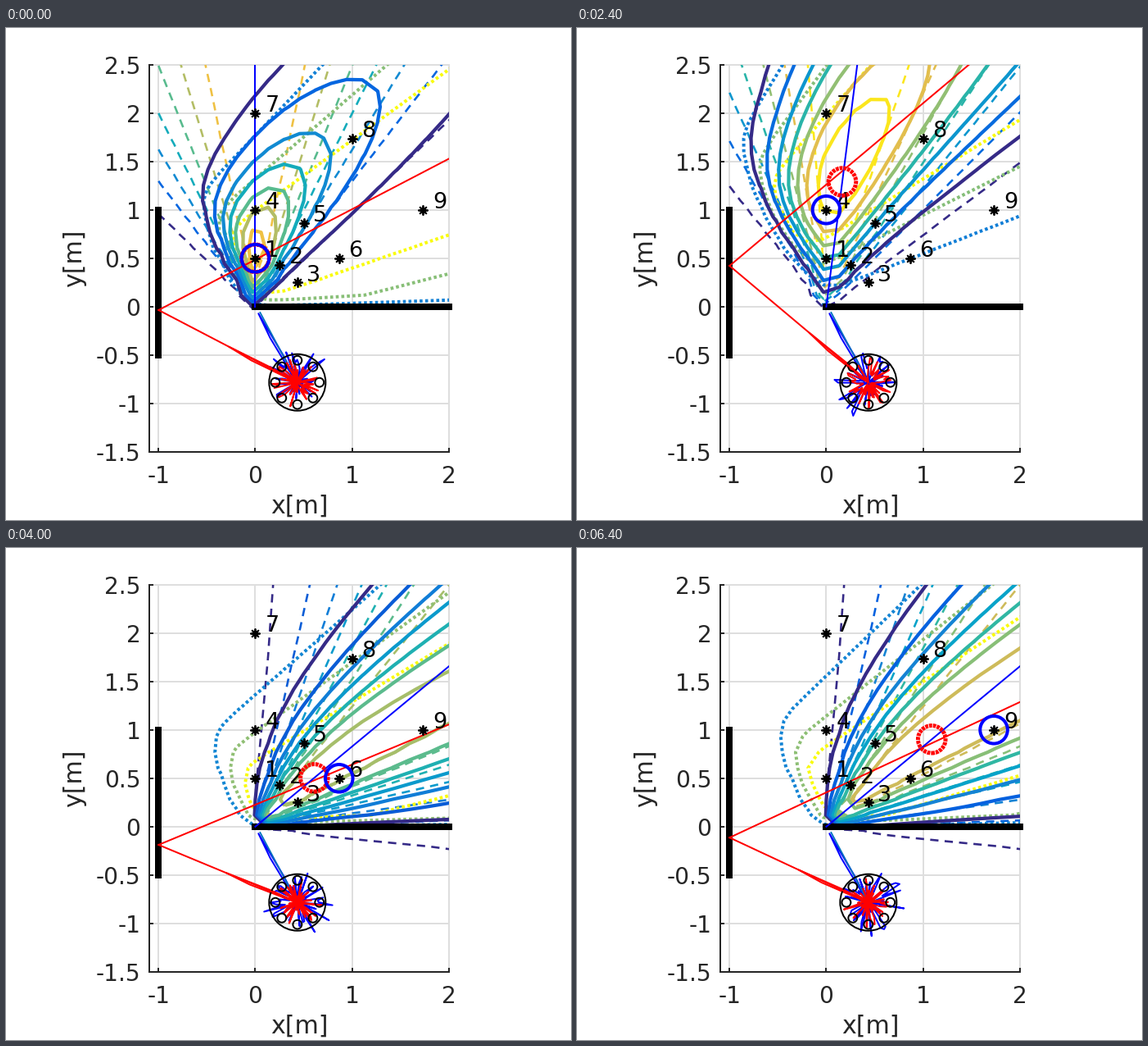
A matplotlib script for the animation above (7200 ms loop, 690 by 600 pixels).

```python
import numpy as np
import matplotlib.pyplot as plt
from matplotlib.animation import FuncAnimation
from matplotlib.colors import LinearSegmentedColormap
from matplotlib.patches import Circle

W, H, DPI = 690, 600, 100
STEP = 800
DARK = "#262626"

plt.rcParams["font.family"] = "DejaVu Sans"
plt.rcParams["axes.unicode_minus"] = False

PARULA = LinearSegmentedColormap.from_list("parula", [
    "#352a87", "#0363e1", "#1484d4", "#06a5c8", "#32b8a1",
    "#8cbf75", "#d3bb58", "#fec437", "#f9fb0e"])

# Three rings of three targets, 30 degrees apart
TARGETS = [(r * np.sin(a), r * np.cos(a))
           for r in (0.5, 1, 2) for a in np.radians((0, 30, 60))]

# Per ring: first and last reading; the middle target lies halfway
BLUE = ((90, 46.8), (82.7, 39.6), (78, 39.6))
RED = ((27.5, 22.5), (40, 22.5), (45, 25))
REACH = ((0.5, 0.43), (1.3, 0.79), (2.11, 1.415))

ARRAY = (0.435, -0.782)
WALL_X = -1
MIRROR = (2 * WALL_X - ARRAY[0], ARRAY[1])
EDGE = 120                        # line of sight past the corner, degrees
SIG_DIFF, SIG_REFL = 22.6, 11.3   # angular spread, degrees

CELL = 0.162
X, Y = np.meshgrid(-1 + CELL * np.arange(20), -1.5 + CELL * np.arange(26))
CORNER_ANG = np.degrees(np.arctan2(Y, X))
MIRROR_ANG = np.degrees(np.arctan2(Y - MIRROR[1], X - MIRROR[0]))


def pt(px):
    return px * 72 / DPI


def polar(r, deg, center=(0, 0)):
    t = np.radians(deg)
    return center[0] + r * np.cos(t), center[1] + r * np.sin(t)


def reading(pairs, i):
    return np.linspace(*pairs[i // 3], 3)[i % 3]


def bell(angle, mean, sigma):
    d = (angle - mean + 180) % 360 - 180
    return np.exp(-0.5 * (d / sigma) ** 2)


def fields(blue, red):
    ux, uy = polar(1, EDGE)
    shade = 1 / (1 + np.exp((Y * ux - X * uy) / 0.065))
    diff = bell(CORNER_ANG, blue, SIG_DIFF)
    refl = bell(MIRROR_ANG, red, SIG_REFL) * shade * (Y > 0)
    return diff, refl


def contours(z, levels, shades, width, dash, z_order):
    ax.contour(X, Y, z, levels=levels, colors=[PARULA(s) for s in shades],
               linewidths=pt(width), linestyles=[dash], zorder=z_order)


def segment(p, q, color, width=2, z_order=6, **style):
    ax.plot((p[0], q[0]), (p[1], q[1]), color=color, lw=pt(width),
            zorder=z_order, **style)


def ring(center, radius, color, width, z_order, dash="solid"):
    ax.add_patch(Circle(center, radius, fill=False, ec=color, lw=pt(width),
                        ls=dash, zorder=z_order))


def beam(rng, angle, length, spread, color, z_order):
    """Spiky polar response with one long main lobe."""
    noise = angle + np.arange(6, 355, 5)
    main = angle + np.arange(-4, 5, 2)
    r_noise = spread * rng.random(noise.size) ** 1.7
    r_main = length * bell(main, angle + 0.4, 1.7)
    a, r = np.append(main, noise), np.append(r_main, r_noise)
    ax.plot(*polar(np.append(r, r[0]), np.append(a, a[0]), ARRAY), color=color,
            lw=pt(2), solid_joinstyle="round", zorder=z_order)


def setup():
    ax.clear()
    ax.set(xlim=(-1.1, 2), ylim=(-1.5, 2.5))
    x_ticks, y_ticks = np.arange(-1, 3), np.arange(-1.5, 2.6, 0.5)
    ax.set_xticks(x_ticks, [f"{v:g}" for v in x_ticks])
    ax.set_yticks(y_ticks, [f"{v:g}" for v in y_ticks])
    ax.set_axisbelow(True)
    ax.grid(color="#dedede", lw=pt(2), clip_on=False)
    ax.tick_params(direction="in", length=pt(5), width=pt(2), color=DARK,
                   labelcolor=DARK, labelsize=pt(28))
    ax.tick_params(axis="x", pad=pt(16))
    ax.tick_params(axis="y", pad=pt(10))
    for name, spine in ax.spines.items():
        spine.set(visible=name in ("left", "bottom"), color=DARK, linewidth=pt(2))


def draw_fields(blue, red):
    diff, refl = fields(blue, red)
    eighths = np.arange(1, 8) / 8
    quarters = np.arange(1, 4)
    top = np.interp(red, (23, 28, 36), (0.67, 0.85, 0.95))
    shades = np.linspace(0, top, 7)
    ratio = (6 / top + 1) / 3     # step of the reflection levels to the others
    refl_shades = (quarters * ratio - 1) / (3 * ratio - 1)
    contours(diff, eighths, shades, 2.6, (0, (3.9, 2.9)), 2)
    contours(refl, quarters / 4, refl_shades, 4, (0, (0.9, 0.8)), 2.2)
    contours(diff * refl, eighths, shades, 4.2, "solid", 2.4)


def draw_room():
    wall = dict(solid_capstyle="projecting", clip_on=False)
    segment((WALL_X, -0.5), (WALL_X, 1), "black", 8, 4, **wall)
    segment((0, 0), (2, 0), "black", 8, 4, **wall)
    for n, (x, y) in enumerate(TARGETS, 1):
        ax.plot(x, y, marker=(8, 2, 0), ms=pt(12), mec="black", mew=pt(1.9),
                zorder=7)
        ax.text(x + 0.1, y + 0.1, str(n), size=pt(27), color="black",
                va="center_baseline", zorder=7)


def draw_array(rng, red):
    beam(rng, EDGE - 0.5, 0.84, 0.38, "blue", 5)
    segment(ARRAY, (0.05, -0.06), "#0072bd", 1.8, 5.1)
    beam(rng, 180 - red, 0.82, 0.27, "red", 5.2)
    ring(ARRAY, 0.292, "black", 2, 5.5)
    for deg in range(0, 360, 45):
        ring(polar(0.228, deg, ARRAY), 0.046, "black", 2, 5.5)


def draw(i):
    setup()
    blue, red, reach = (reading(p, i) for p in (BLUE, RED, REACH))
    draw_fields(blue, red)
    draw_room()
    draw_array(np.random.default_rng(40 + i), red)

    slope = np.tan(np.radians(red))
    hit = (WALL_X, MIRROR[1] + slope * (WALL_X - MIRROR[0]))
    segment(ARRAY, hit, "red")
    segment(hit, polar(5, red, hit), "red")
    segment((0, 0), polar(5, blue), "blue")

    ring(polar(reach, blue), 0.142, "red", 5, 8, (0, (0.75, 0.2)))
    ring(TARGETS[i], 0.142, "blue", 4, 8)
    return []


fig = plt.figure(figsize=(W / DPI, H / DPI), dpi=DPI, facecolor="white")
ax = fig.add_axes((174.5 / W, 1 - 517 / H, 366.2 / W, 472.4 / H))
label = dict(size=pt(30), color=DARK, ha="center", va="center")
fig.text(358 / W, 1 - 583 / H, "x[m]", **label)
fig.text(84 / W, 1 - 281 / H, "y[m]", rotation=90, **label)

anim = FuncAnimation(fig, draw, frames=len(TARGETS), init_func=lambda: [],
                     interval=STEP, repeat=True, repeat_delay=0, blit=False)
plt.show()
```
